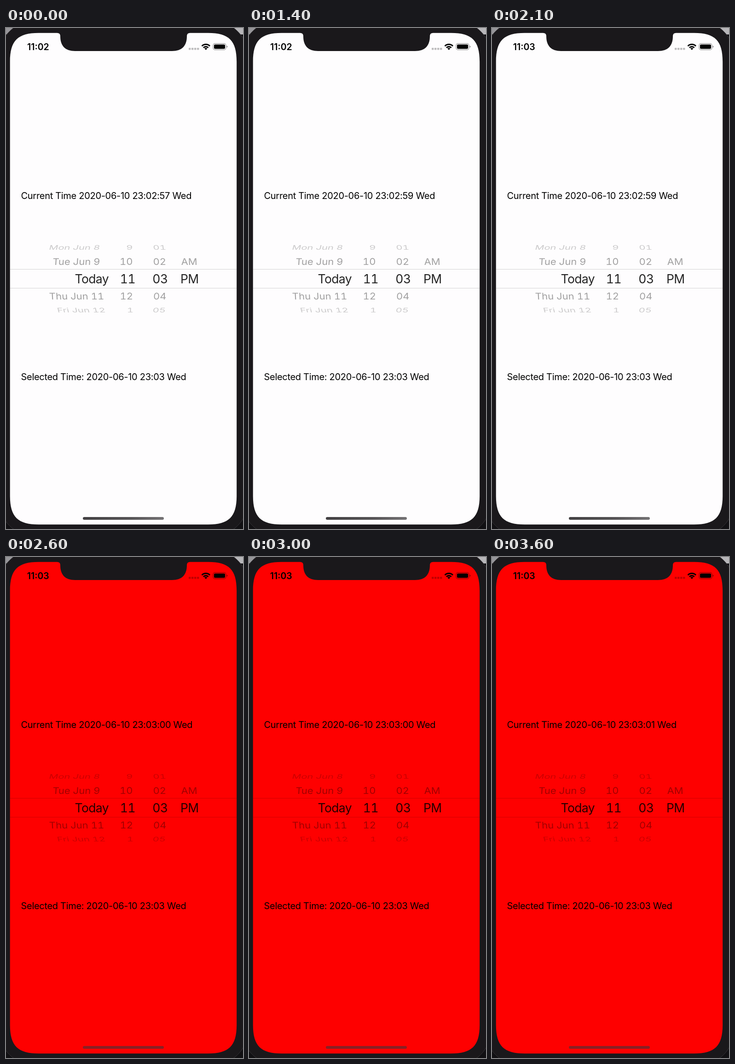
Recreate the animation shown at these times as an HTML page. Size 515 px wide and 1087 px high, loop 3700 ms.

```html
<!DOCTYPE html>
<html lang="en">
<head>
<meta charset="utf-8">
<title>Date picker</title>
<style>
  html, body { margin: 0; width: 100%; height: 100%; overflow: hidden; background: #111013; }
  svg { display: block; width: 515px; height: 1087px; font-family: Inter, "Liberation Sans", sans-serif; }
  .screen { fill: #fefdfe; }
  .bar { fill: url(#barShade); }
  .alarm .screen { fill: #fe0000; }
  .alarm .bar { fill: #882024; }
  .label { font-size: 20px; letter-spacing: -.3px; }
  .clock { font-size: 19.5px; font-weight: 600; }
  #wheel { font-variant-numeric: tabular-nums; }
</style>
</head>
<body>
<svg id="stage" viewBox="0 0 515 1087">
  <defs>
    <linearGradient id="barShade">
      <stop offset="0" stop-color="#434143"/>
      <stop offset=".6" stop-color="#575557"/>
      <stop offset="1" stop-color="#757375"/>
    </linearGradient>
    <linearGradient id="desk">
      <stop offset="0" stop-color="#97969a"/>
      <stop offset="1" stop-color="#b8b7ba"/>
    </linearGradient>
  </defs>

  <rect width="515" height="14" fill="url(#desk)"/>
  <rect x="-16" y="-16" width="543" height="1119" rx="80" fill="#1a181b" stroke="#363438"/>
  <path class="screen" d="M8.7 73C8.7 27.5 25.5 10.8 71 10.8H111Q118 10.8 118 18C118 39 129 50 150 50H361C382 50 393 39 393 18Q393 10.8 400 10.8H439
    C484.5 10.8 501.2 27.5 501.2 73V1015C501.2 1060.5 484.5 1077.2 439 1077.2H71C25.5 1077.2 8.7 1060.5 8.7 1015Z"/>

  <text id="clock" class="clock" x="69.8" y="47.5" text-anchor="middle"></text>
  <g fill-opacity=".25">
    <rect x="397" y="43" width="4.5" height="4.5" rx="1"/>
    <rect x="403" y="43" width="4.5" height="4.5" rx="1"/>
    <rect x="409" y="43" width="4.5" height="4.5" rx="1"/>
    <rect x="415" y="43" width="4.5" height="4.5" rx="1"/>
  </g>
  <g fill="none" stroke="#000" stroke-width="2.9">
    <path d="M425.6 39.2a12.2 12.2 0 0 1 17.4 0"/>
    <path d="M429 42.7a7.6 7.6 0 0 1 10.6 0"/>
  </g>
  <path d="M431.2 44.6a4.6 4.6 0 0 1 6.2 0L434.3 47.8Z"/>
  <rect x="450" y="33.7" width="28" height="13.6" rx="4" fill="none" stroke="#000" stroke-opacity=".42" stroke-width="1.2"/>
  <rect x="452" y="35.7" width="24" height="9.6" rx="2.2"/>
  <path d="M479.6 38.2q2 .7 2 2.3t-2 2.3z" fill-opacity=".45"/>

  <text id="now" class="label" x="32.5" y="371"></text>
  <text class="label" x="32.5" y="763.5">Selected Time: 2020-06-10 23:03 Wed</text>

  <g id="wheel"></g>
  <path d="M9 523.5H501M9 564.5H501" stroke="#000" stroke-opacity=".17"/>
  <rect class="bar" x="167" y="1061" width="176" height="6" rx="3"/>
</svg>

<script>
  const LOOP = 3700;
  const MINUTE_AT = 2100;
  const ALARM_AT = 2400;
  const stage = document.getElementById("stage");
  const clock = document.getElementById("clock");
  const now = document.getElementById("now");
  const wheel = document.getElementById("wheel");

  // Each column: alignment, skew at the outer rows, then [row, text, x].
  const columns = [
    ["end", 14, [[-2, "Mon Jun 8", 204.5], [-1, "Tue Jun 9", 204.5], [0, "Today", 223], [1, "Thu Jun 11", 213], [2, "Fri Jun 12", 216]]],
    ["end", 0, [[-2, "9", 275.5], [-1, "10", 275.5], [0, "11", 281], [1, "12", 276], [2, "1", 277]]],
    ["middle", -8, [[-2, "01", 333.5], [-1, "02", 333.8], [0, "03", 334.8], [1, "04", 334.3], [2, "05", 333]]],
    ["start", -8, [[-1, "AM", 380.5], [0, "PM", 379]]]
  ];
  const sizes = [26.5, 22, 22];
  const shades = [.86, .37, .2];

  function addRow(anchor, skew, [row, label, x]) {
    const depth = Math.abs(row);
    const angle = row * 25.8 * Math.PI / 180;
    const y = 544.3 + 87 * Math.sin(angle);
    const lean = skew * row * depth / 4;
    const text = document.createElementNS("http://www.w3.org/2000/svg", "text");
    text.setAttribute("transform", `translate(${x} ${y}) skewX(${lean}) scale(1 ${Math.cos(angle)})`);
    text.setAttribute("y", sizes[depth] * .364);
    text.setAttribute("font-size", sizes[depth]);
    text.setAttribute("text-anchor", anchor);
    text.setAttribute("fill-opacity", shades[depth]);
    if (!depth) text.setAttribute("letter-spacing", -.6);
    text.textContent = label;
    wheel.append(text);
  }

  for (const [anchor, skew, rows] of columns) rows.forEach(row => addRow(anchor, skew, row));

  const pad = n => String(n).padStart(2, "0");

  function draw(t) {
    const seconds = 2 * 60 + 57 + Math.floor((t + 600) / 1000);
    now.textContent = `Current Time 2020-06-10 23:${pad(Math.floor(seconds / 60))}:${pad(seconds % 60)} Wed`;
    clock.textContent = t < MINUTE_AT ? "11:02" : "11:03";
    stage.classList.toggle("alarm", t >= ALARM_AT);
  }

  const start = performance.now();
  function tick() {
    draw((performance.now() - start) % LOOP);
    requestAnimationFrame(tick);
  }
  tick();
</script>
</body>
</html>
```
